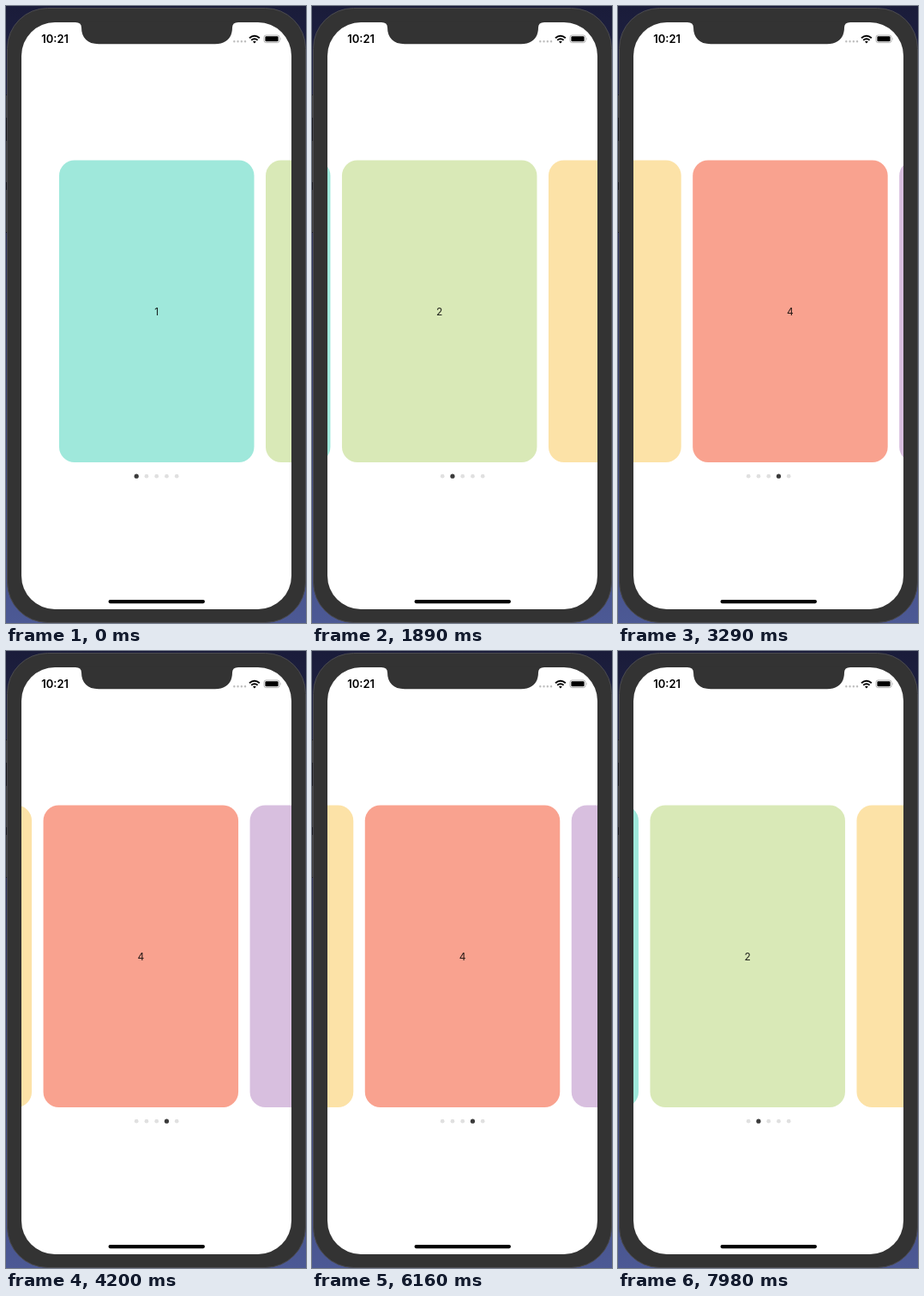
Recreate the animation shown at these times as an HTML page. Size 350 by 718 pixels, loop 8 s.

```html
<!DOCTYPE html>
<html lang="en">
<head>
<meta charset="utf-8">
<title>Card carousel</title>
<style>
  html, body { margin: 0; width: 100%; height: 100%; overflow: hidden; }
  svg { display: block; width: 100vw; height: 100vh; }
  text { font-family: Inter, Roboto, sans-serif; }
</style>
</head>
<body>
<svg viewBox="0 0 350 718" xmlns="http://www.w3.org/2000/svg">
  <defs>
    <linearGradient id="sky" x2="0" y2="1">
      <stop offset="0" stop-color="#1a1c3a"/>
      <stop offset=".45" stop-color="#30355f"/>
      <stop offset="1" stop-color="#4c5995"/>
    </linearGradient>
    <clipPath id="screen"><rect x="18" y="19" width="315" height="683" rx="39"/></clipPath>
  </defs>
  <rect width="350" height="718" fill="url(#sky)"/>

  <!-- phone body and side buttons -->
  <path d="M0 103h2v161H0z" fill="#16171c"/>
  <path d="M0 104h2.5v26H0zM0 157h2.5v48H0zM0 214h2.5v49H0zM347.5 156h2.5v84h-2.5z" fill="#3b3b3d"/>
  <rect x="1.5" y="2.5" width="348" height="715" rx="47" fill="#333" stroke="#4b4b50"/>

  <g clip-path="url(#screen)">
    <rect x="18" y="19" width="315" height="683" fill="#fff"/>
    <g id="cards"></g>
    <g id="dots"></g>
    <rect x="119.5" y="691" width="112.5" height="4.2" rx="2.1"/>
  </g>
  <path d="M81 18.5h190v.5q-7 0-7 6c0 12-7 19.2-20 19.2H108C95 44.2 88 37 88 25q0-6-7-6z" fill="#333"/>

  <!-- status bar -->
  <text x="41.3" y="43" font-size="13" font-weight="600">10:21</text>
  <path d="M266.3 41.3h12.9" stroke="#bdbdbd" stroke-width="2.4" stroke-linecap="round" stroke-dasharray="0 4.25"/>
  <g fill="none" stroke="#000" stroke-width="1.9">
    <path d="M284 37.3q5.9-5 11.8 0"/>
    <path d="M286.2 39.8q3.7-3 7.4 0"/>
  </g>
  <path d="M288 41.4q1.9-1.5 3.8 0l-1.9 2z"/>
  <rect x="301" y="34" width="18" height="8.6" rx="2.4" fill="#fff" stroke="#aaa" stroke-width=".9"/>
  <rect x="302.4" y="35.3" width="15.2" height="6" rx="1.2"/>
  <path d="M320.3 36.8q1.4 1.5 0 3z" fill="#aaa"/>
</svg>
<script>
  const NS = 'http://www.w3.org/2000/svg';
  const LOOP = 8000, STEP = 70;
  const PITCH = 241, LEFT = 62, WIDTH = 227.5;
  const TAU = 115;             // decay of the release, ms
  const DRAG = 2 * TAU;        // finger phase; speed is continuous at release
  const COLORS = ['#9fe8db', '#d9e9b7', '#fce2a7', '#f9a28f', '#d8bfdf'];
  // [start time, direction]
  const SWIPES = [
    [595, 1], [1781, 1], [2880, 1], [4110, 1],
    [5210, -1], [6395, -1], [7567, -1]
  ];

  function add(parent, tag, attrs, text) {
    const el = document.createElementNS(NS, tag);
    for (const k in attrs) el.setAttribute(k, attrs[k]);
    if (text) el.textContent = text;
    return parent.appendChild(el);
  }

  const cardLayer = document.getElementById('cards');
  const dotLayer = document.getElementById('dots');

  const cards = COLORS.map((fill, i) => {
    const g = add(cardLayer, 'g', {});
    add(g, 'rect', { y: 179.5, width: WIDTH, height: 351.5, rx: 18, fill });
    add(g, 'text', {
      x: WIDTH / 2, y: 359.7, 'font-size': 12, 'text-anchor': 'middle', fill: '#000', opacity: .85
    }, String(i + 1));
    return g;
  });
  const dots = COLORS.map((_, i) => add(dotLayer, 'circle', { cx: 152.2 + 11.75 * i, cy: 547.2 }));

  // Share of a page travelled, dt ms after the finger lands
  function travel(dt) {
    if (dt <= 0) return 0;
    if (dt < DRAG) return .5 * (dt / DRAG) ** 2;
    return 1 - .5 * Math.exp((DRAG - dt) / TAU);
  }

  function render(ms) {
    const t = Math.floor((ms % LOOP) / STEP) * STEP;
    const page = SWIPES.reduce((sum, [start, dir]) => sum + dir * travel(t - start), 0);
    const active = Math.round(page);
    cards.forEach((g, i) => {
      const x = LEFT + PITCH * (i - page);
      g.setAttribute('transform', `translate(${x.toFixed(2)} 0)`);
    });
    dots.forEach((dot, i) => {
      dot.setAttribute('r', i === active ? 2.6 : 2.35);
      dot.setAttribute('fill', i === active ? '#3a3a3a' : '#e0e0e0');
    });
  }

  const began = performance.now();
  function tick() {
    render(performance.now() - began);
    requestAnimationFrame(tick);
  }
  tick();
</script>
</body>
</html>
```
